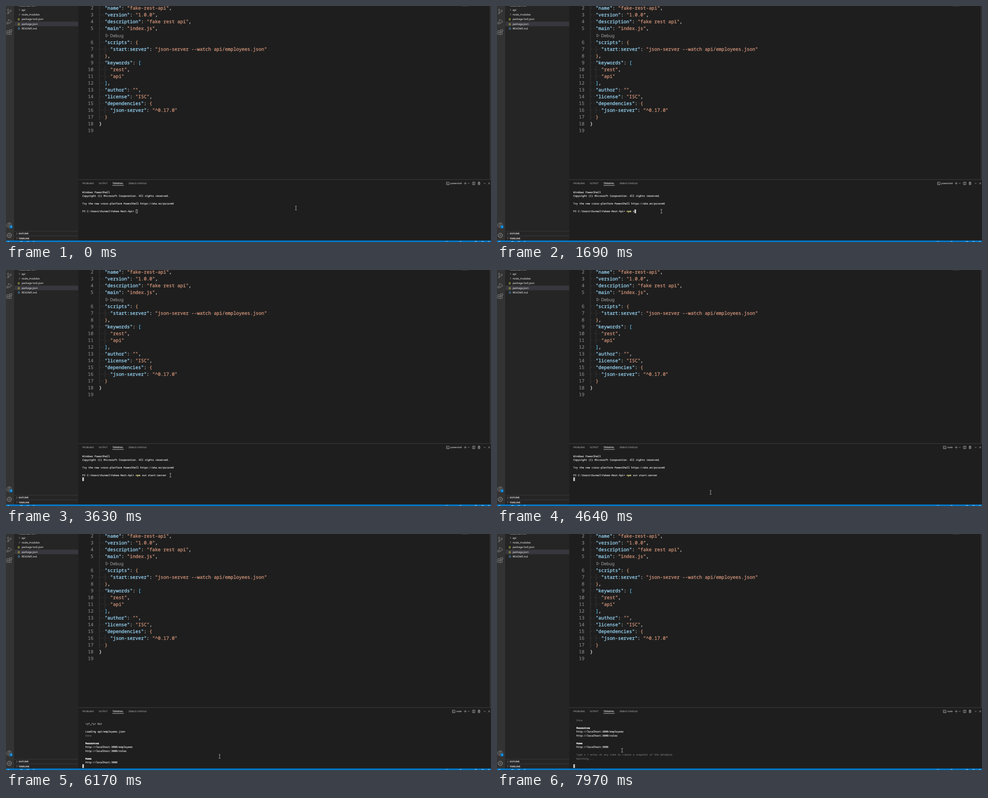
Recreate the animation shown at these times as an HTML page. Size 1074 by 522 pixels, loop 8 s.

```html
<!DOCTYPE html>
<html lang="en">
<head>
<meta charset="utf-8">
<title>Starting a JSON server</title>
<style>
  html, body { margin: 0; width: 100%; height: 100%; overflow: hidden; background: #1e1e1e; }
  svg { display: block; width: 1074px; height: 522px; }
  text { white-space: pre; text-rendering: geometricPrecision; }
  text, tspan { fill: currentColor; stroke: currentColor; }
  .ui { font: 5.8px "Noto Sans", "Open Sans", sans-serif; color: #d2d2d2; stroke-width: .1; }
  .small { font-size: 4.9px; }
  .tab { color: #a0a0a0; }
  .on { color: #f0f0f0; }
  .bold { font-weight: 700; }
  .code { font: 10.33px "Noto Sans Mono", "DejaVu Sans Mono", monospace; color: #dcdcdc; stroke-width: .28; }
  .num { color: #8c8c8c; text-anchor: end; stroke-width: .12; }
  .key { color: #9cdcfe; }
  .str { color: #d6977c; }
  .curly { color: #dc9c74; }
  .square { color: #5cbcec; }
  .dot { color: #434343; }
  .term { font: 5.643px "Noto Sans Mono", "DejaVu Sans Mono", monospace; color: #dadada; stroke-width: .2; }
  .term .cmd { color: #f3f3a0; }
  .term .head { color: #fff; font-weight: 700; }
  .term .dim { color: #666; }
  .line { fill: none; stroke: #858585; stroke-width: 1; }
  .thin { fill: none; stroke: #c5c5c5; stroke-width: .7; }
</style>
</head>
<body>
<svg viewBox="0 0 1074 522">
  <rect width="1074" height="522" fill="#1e1e1e"/>
  <rect width="18.6" height="522" fill="#333"/>
  <rect x="18.6" width="141.4" height="522" fill="#252526"/>

  <!-- activity bar -->
  <g class="line">
    <circle cx="4.6" cy="8.4" r="1.5"/>
    <circle cx="10.4" cy="10.4" r="1.5"/>
    <circle cx="4.6" cy="16.2" r="1.5"/>
    <path d="M4.6 10v4.6M10.4 12q0 2-5.6 2.2"/>
    <path d="M5.4 33.5V29.6L13 34.6 7.6 38.3"/>
    <circle cx="4.4" cy="37.6" r="2.1"/>
    <path d="M1.4 35.2l1.3 1M1.2 37.8h1.2M1.4 40.4l1.3-1M6.4 37.8h1.4"/>
    <path d="M2 54.5h5v8.4H2zM2 58.7h9.6v4.2H7M8.6 52.4h4.2v4.2H8.6z"/>
    <circle cx="7.2" cy="484.8" r="5.4"/>
    <circle cx="7.2" cy="483.2" r="2"/>
    <path d="M3.6 488.8q3.6-5 7.2 0"/>
    <circle cx="7.3" cy="507.3" r="4.3"/>
    <circle cx="7.3" cy="507.3" r="1.5"/>
    <circle cx="7.3" cy="507.3" r="5.1" stroke-width="1.3" stroke-dasharray="2 2"/>
  </g>
  <circle cx="11.3" cy="488.4" r="3.4" fill="#007acc"/>
  <text class="ui" x="10.1" y="490" style="font-size:4.3px;color:#fff">1</text>

  <!-- explorer -->
  <rect x="18.6" y="34.5" width="141.4" height="10.3" fill="#37373d"/>
  <text class="ui small bold" x="28" y=".8">FAKEE-REST-API</text>
  <g id="files"></g>
  <path class="thin" d="M28.9 6.6l2 2-2 2M28.9 16.9l2 2-2 2M23 501.4l2 2-2 2M23 511.6l2 2-2 2"/>
  <text class="ui bold" x="26" y="31.3" style="font-size:5.6px;color:#cbcb41">{}</text>
  <text class="ui bold" x="26" y="41.7" style="font-size:5.6px;color:#cbcb41">{}</text>
  <circle cx="28.6" cy="49.8" r="2.3" fill="none" stroke="#519aba" stroke-width=".8"/>
  <path d="M28.6 48.2v.7M28.6 49.4v1.8" stroke="#519aba" stroke-width=".8"/>
  <path d="M18.6 498.2H160M18.6 508.5H160" stroke="#414142" stroke-width=".8"/>
  <text class="ui small bold" x="28" y="505.4">OUTLINE</text>
  <text class="ui small bold" x="28" y="515.7">TIMELINE</text>

  <!-- editor -->
  <path d="M206.8 0V253M219.2 87.8v15M219.2 133v30M219.2 223.3v15" stroke="#404040" stroke-width=".8"/>
  <g id="code"></g>
  <path d="M221.2 62l5 3.4-5 3.4z" fill="none" stroke="#999" stroke-width=".9"/>
  <text class="ui" x="230.2" y="68.5" style="font-size:9.6px;color:#999">Debug</text>
  <path d="M1009 .5h15" stroke="#3c3c3c"/>
  <rect x="1071.6" width="1.2" height="384" fill="#484848"/>

  <!-- panel -->
  <rect x="160" y="383.6" width="914" height=".8" fill="#4a4a4a"/>
  <g class="ui small">
    <text class="tab" x="169" y="394.4">PROBLEMS</text>
    <text class="tab" x="205.3" y="394.4">OUTPUT</text>
    <text class="on" x="235.8" y="394.4">TERMINAL</text>
    <text class="tab" x="271.4" y="394.4">DEBUG CONSOLE</text>
    <text id="shell" x="1009" y="394.4" text-anchor="end"></text>
  </g>
  <rect x="235.8" y="396.5" width="24.8" height=".8" fill="#e7e7e7"/>
  <path id="shellIcon" class="thin" d="M.4 389.6h5.8v5.8H.4zM1.6 391l1.5 1.5-1.5 1.5M3.5 394.2h1.7"/>
  <path class="thin" d="M1014 392.3h6M1017 389.3v6M1023.2 391.4l1.6 1.6 1.6-1.6
    M1033 389.6h5.4v5.6H1033zM1035.7 389.6v5.6
    M1045 390.2h5M1046.5 390.2v-1h2v1M1045.6 390.2v5h3.8v-5M1046.9 391.3v3M1048.2 391.3v3
    M1058 393.4l2-2 2 2M1067.9 390.3l4 4M1071.9 390.3l-4 4"/>
  <g id="rows" class="term"></g>
  <rect id="caret"/>

  <!-- status bar -->
  <rect y="518.7" width="1074" height="3.3" fill="#007acc"/>
  <path d="M3.5 520.9h4M31.5 521.4q2.5-2 5 0M46 521.4q2.5-2 5 0M60 521.6l1.4-1.6 1.4 1.6
    M974 520.9h1.6M977 520.9h1.6M1004.5 521.4q2-1.6 4 0M1038 520.8h5M1053 520.8h5M1067 521.4q2-2 4 0"
    fill="none" stroke="#d5e8f5" stroke-width=".8"/>

  <path id="mouse" d="M-2-4.3q1.6 0 2 .8q.4-.8 2-.8M0-3.5v7M-2 4.3q1.6 0 2-.8q.4.8 2 .8"
    fill="none" stroke="#d0d0d0" stroke-width=".8"/>
</svg>

<script>
const $ = id => document.getElementById(id);
const LOOP = 8000;

$('files').innerHTML = ['api', 'node_modules', 'package-lock.json', 'package.json', 'README.md']
  .map((name, i) => `<text class="ui" x="34.5" y="${10.7 + 10.3 * i}">${name}</text>`).join('');

const source = `  "name": "fake-rest-api",
  "version": "1.0.0",
  "description": "fake rest api",
  "main": "index.js",

  "scripts": {
    "start:server": "json-server --watch api/employees.json"
  },
  "keywords": [
    "rest",
    "api"
  ],
  "author": "",
  "license": "ISC",
  "dependencies": {
    "json-server": "^0.17.0"
  }
}
`.split('\n');

const span = (cls, s) => `<tspan class="${cls}">${s}</tspan>`;
const dots = s => s.replace(/ +/g, m => '\u0000'.repeat(m.length));
function highlight(line) {
  const nested = line.startsWith(' ');
  return line
    .replace(/"[^"]*"(:?)|[{}]|[\[\]]| +/g, (m, colon) => {
      if (m[0] === '"') return colon ? span('key', m.slice(0, -1)) + ':' : span('str', dots(m));
      if (m[0] === ' ') return dots(m);
      if ('[]'.includes(m)) return span('square', m);
      return nested ? span('curly', m) : m;
    })
    .replace(/\u0000+/g, m => span('dot', '·'.repeat(m.length)));
}

let number = 2;
$('code').innerHTML = source.map((line, i) => {
  const y = (8.2 + 15.07 * i).toFixed(2);
  if (i === 4) return '';   // code lens row
  return `<text class="code num" x="193.6" y="${y}">${number++}</text>` +
    `<text class="code" x="206" y="${y}">${highlight(line)}</text>`;
}).join('');

// Terminal
const COL = 3.386, ROW = 8.45, LEFT = 169, TOP = 412, VISIBLE = 13;
const prompt = 'PS C:\\Users\\Durmal\\Fakee-Rest-Api> ';
const command = 'npm run start:server';
const keyTimes = [1290, 1370, 1490, 1600, 1690, 1820, 1880, 1950,
  2150, 2290, 2380, 2480, 2610, 2750, 3020, 3060, 3100, 3290, 3370, 3500];
const log = [
  'Windows PowerShell',
  'Copyright (C) Microsoft Corporation. All rights reserved.',
  '',
  'Try the new cross-platform PowerShell https://aka.ms/pscore6',
  '',
  prompt,
  '',
  '> fake-rest-api@1.0.0 start:server',
  '> json-server --watch api/employees.json',
  '', '',
  '  \\{^_^}/ hi!',
  '',
  '  Loading api/employees.json',
  span('dim', '  Done'),
  '',
  span('head', '  Resources'),
  '  http://localhost:3000/employees',
  '  http://localhost:3000/roles',
  '',
  span('head', '  Home'),
  '  http://localhost:3000',
  '',
  span('dim', '  Type s + enter at any time to create a snapshot of the database'),
  span('dim', '  Watching...'),
  '', ''
];
// [time, row of the caret]
const output = [[0, 5], [3630, 6], [5440, 10], [6100, 14], [6165, 22], [6230, 26]];

let drawn = '';
function drawTerminal(t) {
  const typed = keyTimes.filter(k => k <= t).length;
  const caretRow = output.filter(o => o[0] <= t).pop()[1];
  const focused = t >= 800;
  const state = [typed, caretRow, focused].join();
  if (state === drawn) return;
  drawn = state;

  const top = Math.max(0, caretRow - VISIBLE + 1);
  const text = command.slice(0, typed);
  $('rows').innerHTML = log.slice(top, caretRow + 1).map((line, i) => {
    const body = line === prompt ? line + span('cmd', text.slice(0, 3)) + text.slice(3) : line;
    return `<text x="${LEFT}" y="${(TOP + 2 + ROW * i).toFixed(2)}">${body}</text>`;
  }).join('');

  const col = caretRow === 5 ? prompt.length + typed : 0;
  const inset = focused ? 0 : .4;
  const box = {
    x: LEFT + COL * col + inset,
    y: TOP - 4.1 + ROW * (caretRow - top) + inset,
    width: 3.5 - inset, height: 8.2 - 2 * inset,
    fill: focused ? '#ccc' : 'none',
    stroke: focused ? 'none' : '#ccc', 'stroke-width': .8
  };
  for (const k in box) $('caret').setAttribute(k, box[k]);
}

// Pointer moves in steps: start, end, step count, from, to, sideways bow
const moves = [
  [130, 800, 10, [642, 447], [364, 454], 10],
  [4430, 4640, 4, [364, 454], [473, 492], 0],
  [7570, 7970, 7, [473, 492], [277, 478.5], -6]
];
function pointer(t) {
  const [start, end, n, a, b, bow] = moves.filter(m => m[0] <= t).pop() || moves[0];
  const step = t < start ? 0 : Math.min(n, 1 + Math.floor((t - start) / (end - start) * (n - 1) + 1e-6));
  const u = step / n, e = u * u * (3 - 2 * u);
  return [a[0] + (b[0] - a[0]) * e, a[1] + (b[1] - a[1]) * e + bow * Math.sin(Math.PI * e)];
}

function draw(t) {
  drawTerminal(t);
  const node = t >= 4430;
  $('shell').textContent = node ? 'node' : 'powershell';
  $('shellIcon').setAttribute('transform', `translate(${node ? 988 : 975})`);
  $('mouse').setAttribute('transform', `translate(${pointer(t)})`);
}

const began = performance.now();
function tick() {
  draw((performance.now() - began) % LOOP);
  requestAnimationFrame(tick);
}
tick();
</script>
</body>
</html>
```
